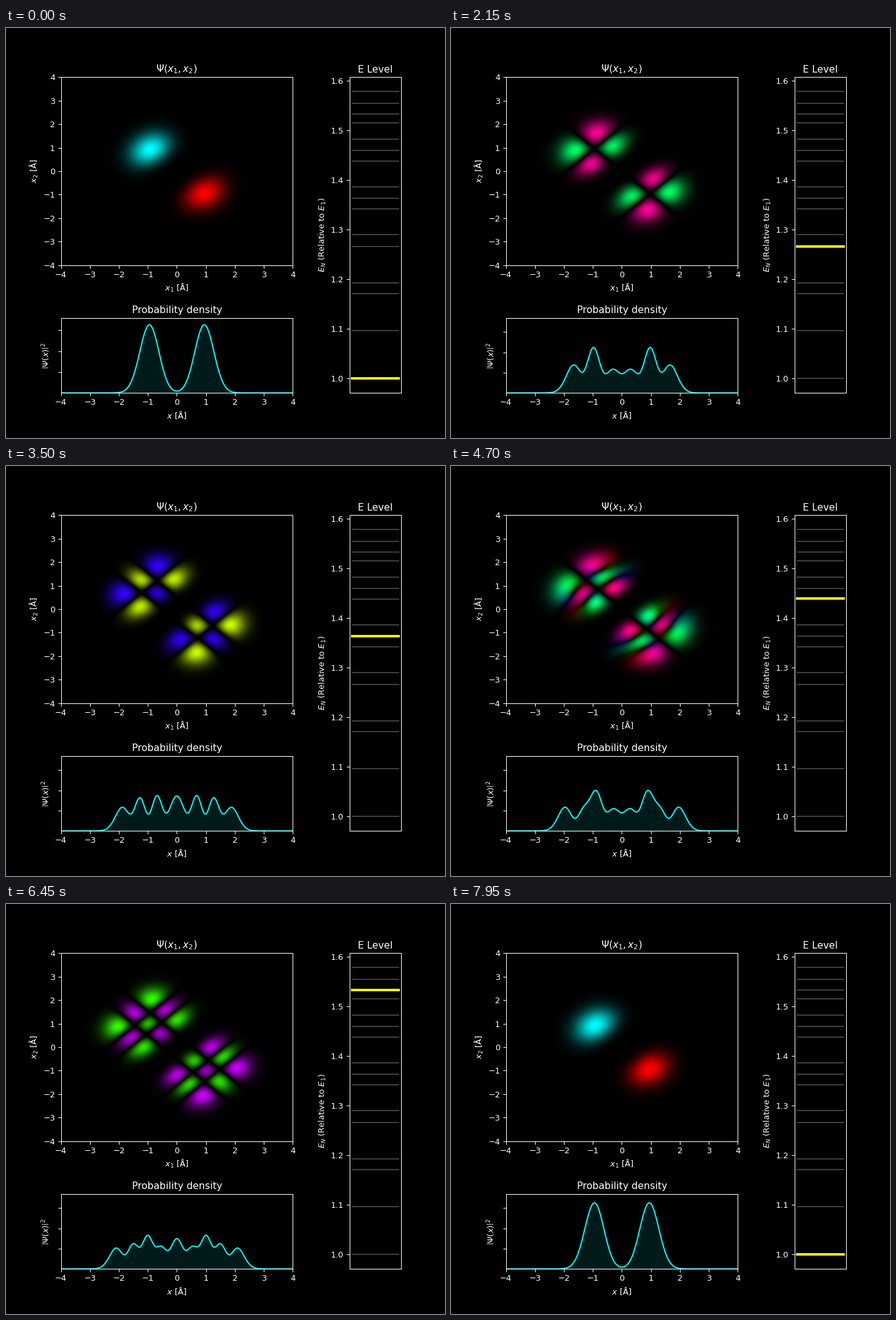
These frames come from a looping animation (700x653 px, 8000 ms). A matplotlib script:

```python
import numpy as np
import matplotlib.pyplot as plt
from matplotlib.animation import FuncAnimation
from matplotlib.colors import hsv_to_rgb

plt.style.use("dark_background")

N, EXTENT = 150, 8.0
HBAR2_M = 7.62            # eV Å^2
SPRING, COULOMB = 100.0, 298.0
STEPS = 10                # frames per state: half at rest, half blending

# (centre-of-mass quanta, relative quanta, sign, energy / ground energy)
STATES = [
    (0, 0, 1, 1.0), (1, 0, 1, 1.0967), (0, 1, 1, 1.1712), (2, 0, 1, 1.1932),
    (1, 1, 1, 1.2664), (3, 0, 1, 1.2900), (0, 2, 1, 1.3420), (2, 1, -1, 1.3632),
    (4, 0, -1, 1.3866), (1, 2, -1, 1.4374), (3, 1, -1, 1.4588), (5, 0, -1, 1.4825),
    (0, 3, -1, 1.5152), (2, 2, -1, 1.5330), (4, 1, -1, 1.5545), (6, 0, -1, 1.5778),
]
FRAMES = STEPS * len(STATES)

x = np.linspace(-EXTENT / 2, EXTENT / 2, N)
x1, x2 = np.meshgrid(x, x)
centre, half = (x1 + x2) / 2, (x2 - x1) / 2


def relative_modes(count, points=500, reach=4.0):
    """Lowest states of the half distance under spring and repulsion."""
    s = np.linspace(0, reach, points + 1)[1:]
    kin = HBAR2_M / 4 / (s[1] - s[0]) ** 2
    off = np.full(points - 1, -kin)
    h = np.diag(2 * kin + SPRING * s**2 + COULOMB / (2 * s))
    h += np.diag(off, 1) + np.diag(off, -1)
    vecs = np.linalg.eigh(h)[1][:, :count].T
    outer = np.argmin(abs(s - 2))
    return s, [v * np.sign(v[outer]) for v in vecs]


def centre_mode(a):
    u = centre / np.sqrt(np.sqrt(HBAR2_M / SPRING) / 2)
    return np.polynomial.hermite.hermval(u, [0] * a + [1]) * np.exp(-u**2 / 2)


s_grid, modes = relative_modes(4)


def eigenstate(k):
    a, b, sign, _ = STATES[k]
    psi = sign * centre_mode(a) * np.sign(half) * np.interp(abs(half), s_grid, modes[b])
    return psi / np.linalg.norm(psi) * np.exp(2j * np.pi * k / 10)


waves = [eigenstate(k) for k in range(len(STATES))]
levels = [state[3] for state in STATES]


def blend(i):
    """Wave function and energy at frame i."""
    k, step = divmod((i + 2) % FRAMES, STEPS)
    nxt = (k + 1) % len(STATES)
    angle = np.pi * max(0, step - STEPS // 2) / STEPS
    c, s = np.cos(angle), np.sin(angle)
    return c * waves[k] + s * waves[nxt], c**2 * levels[k] + s**2 * levels[nxt]


def density(psi):
    return (abs(psi) ** 2).sum(axis=0)


def to_rgb(z):
    r = abs(z)
    hue = (np.angle(z) + np.pi) / (2 * np.pi)
    return hsv_to_rgb(np.dstack([hue, np.ones_like(r), r / r.max()]))


# The density axis only ever grows
peaks = [density(blend(i)[0]).max() for i in range(FRAMES)]
tops = 1.1 * np.maximum.accumulate(peaks)

fig = plt.figure(figsize=(7.5, 6.99643), dpi=280 / 3)   # 700 x 653 px
grid = fig.add_gridspec(2, 2, width_ratios=[4.5, 1], height_ratios=[2.5, 1],
                        hspace=0.4, wspace=0.4, bottom=0.1098)
ax_psi = fig.add_subplot(grid[0, 0])
ax_prob = fig.add_subplot(grid[1, 0])
ax_level = fig.add_subplot(grid[:, 1])

ax_psi.set_title(r"$\Psi(x_1,x_2)$")
ax_psi.set_xlabel("$x_1$ [Å]")
ax_psi.set_ylabel("$x_2$ [Å]")
image = ax_psi.imshow(to_rgb(waves[0]), extent=[-4, 4, -4, 4], origin="lower",
                      aspect="auto", interpolation="bilinear")

ax_prob.set_title("Probability density")
ax_prob.set_xlabel("$x$ [Å]")
ax_prob.set_ylabel(r"${\left| \Psi (x)\right|}^2$")
ax_prob.set_xlim(-4, 4)
ax_prob.set_yticks([0.01, 0.02, 0.03], labels=[])
curve, = ax_prob.plot(x, density(waves[0]), color="cyan")
fill = ax_prob.fill_between(x, density(waves[0]), color="cyan", alpha=0.1)

ax_level.set_title("E Level")
ax_level.set_ylabel("$E_N$ (Relative to $E_{1}$)")
ax_level.set_xticks([])
for e in levels:
    ax_level.plot([0, 1], [e, e], color="gray", alpha=0.5)
marker, = ax_level.plot([0, 1], [1, 1], color="yellow", lw=3)


def update(i):
    psi, energy = blend(i)
    p = density(psi)
    image.set_data(to_rgb(psi))
    curve.set_ydata(p)
    outline = np.column_stack([np.r_[x, x[::-1]], np.r_[p, 0 * p]])
    fill.set_verts([outline])
    ax_prob.set_ylim(0, tops[i])
    marker.set_ydata([energy, energy])
    return image, curve, fill, marker


anim = FuncAnimation(fig, update, frames=FRAMES, interval=50, repeat=True)
plt.show()
```
